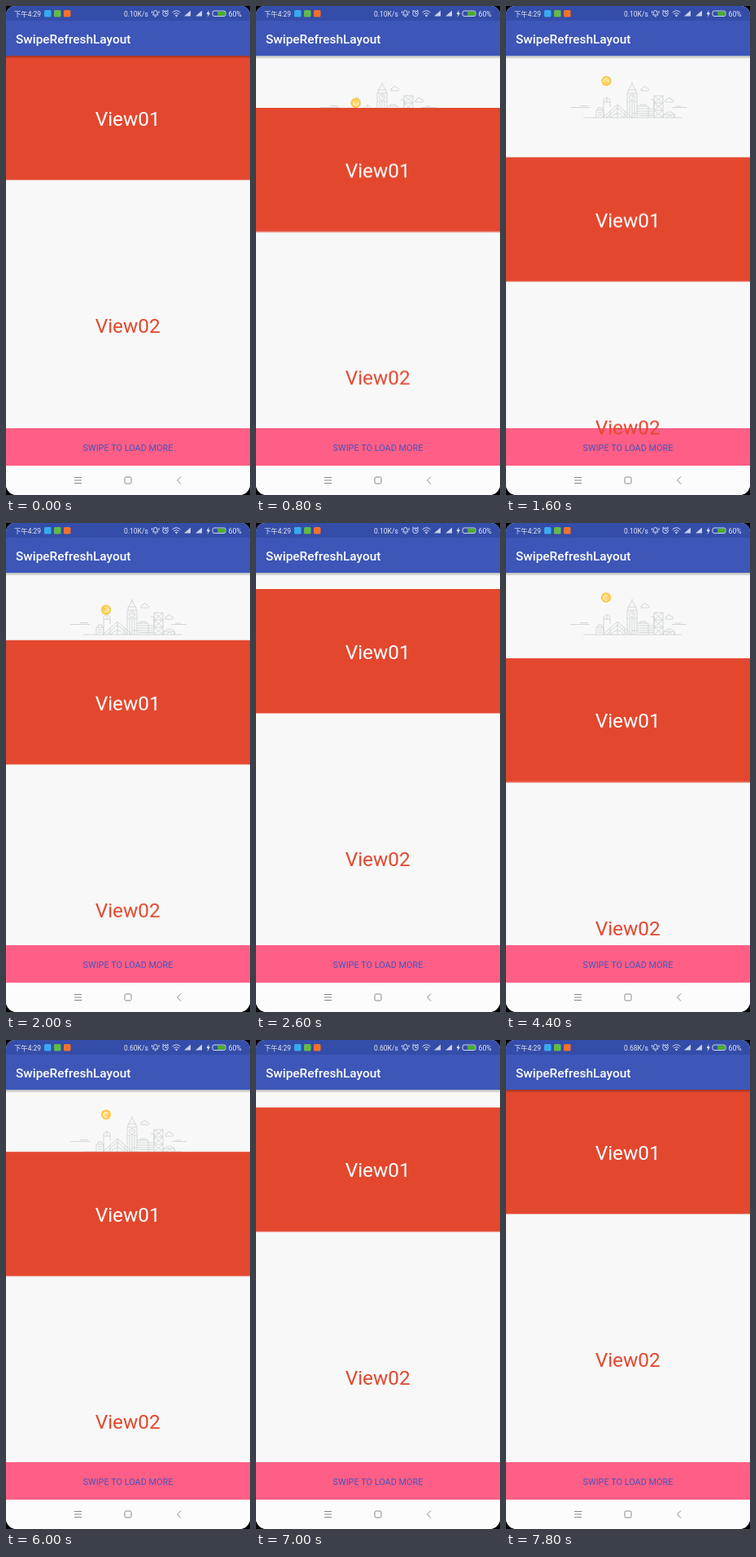
These frames come from a looping animation (300 px wide and 600 px high, 8 s). An HTML page:

```html
<!DOCTYPE html>
<html lang="en">
<head>
<meta charset="utf-8">
<title>Pull to refresh</title>
<style>
  html, body { margin: 0; width: 100%; height: 100%; overflow: hidden; background: #000; }
  svg { display: block; width: 300px; height: 600px; font-family: Roboto, "Noto Sans CJK SC", "Noto Sans CJK", sans-serif; }

  .content, .rise, .spin, .speed { animation: 8s infinite; }
  .content { animation-name: pull; }
  .rise { animation-name: rise; }
  .spin { animation-name: spin; animation-timing-function: steps(40); }
  .speed { animation-timing-function: step-end; }
  .idle { animation-name: idle; }
  .load { animation-name: load; }
  .done { animation-name: done; }

  /* Each segment advances once every 200 ms. */
  @keyframes pull {
    0%    { transform: translateY(0); animation-timing-function: step-end; }
    2.5%  { transform: translateY(0); animation-timing-function: steps(3); }
    10%   { transform: translateY(63.5px); animation-timing-function: steps(4); }
    20%   { transform: translateY(124.6px); animation-timing-function: steps(5); }
    32.5% { transform: translateY(20px); animation-timing-function: steps(3); }
    40%   { transform: translateY(140px); animation-timing-function: step-end; }
    42.5% { transform: translateY(104.5px); animation-timing-function: step-end; }
    65%   { transform: translateY(104.5px); animation-timing-function: steps(4); }
    75%   { transform: translateY(76.2px); animation-timing-function: steps(7); }
    92.5%, 100% { transform: translateY(0); }
  }
  @keyframes rise {
    0%    { transform: translate(123px, 161px); animation-timing-function: step-end; }
    2.5%  { transform: translate(123px, 161px); animation-timing-function: steps(3); }
    10%   { transform: translate(123px, 119px); animation-timing-function: steps(3); }
    17.5% { transform: translate(123px, 92px); animation-timing-function: step-end; }
    22.5% { transform: translate(123px, 92px); animation-timing-function: steps(4); }
    32.5% { transform: translate(123px, 148px); animation-timing-function: steps(3); }
    40%, 92.5% { transform: translate(123px, 92px); animation-timing-function: step-end; }
    100%  { transform: translate(123px, 161px); }
  }
  @keyframes spin { to { transform: rotate(1800deg); } }
  @keyframes idle { 0% { opacity: 1; } 57.5%, 100% { opacity: 0; } }
  @keyframes load { 0% { opacity: 0; } 57.5% { opacity: 1; } 97.5%, 100% { opacity: 0; } }
  @keyframes done { 0% { opacity: 0; } 97.5%, 100% { opacity: 1; } }
</style>
</head>
<body>
<svg viewBox="0 0 300 600">
  <defs>
    <linearGradient id="shade" x2="0" y2="1">
      <stop stop-color="#000" stop-opacity=".28"/>
      <stop offset="1" stop-color="#000" stop-opacity="0"/>
    </linearGradient>
    <path id="signal" d="M0 7H8V0Z"/>
    <path id="cloud" d="M0 6H9Q11 5 9 3Q8 2 7 3Q6 -1 3 1Q2 2 2 3Q-1 3 0 6Z"/>
    <clipPath id="screen">
      <path d="M11 0H289A11 11 0 0 1 300 11V587A13 13 0 0 1 287 600H13A13 13 0 0 1 0 587V11A11 11 0 0 1 11 0Z"/>
    </clipPath>
  </defs>

  <g clip-path="url(#screen)">
    <rect width="300" height="600" fill="#f8f8f8"/>

    <!-- Skyline -->
    <g fill="none" stroke="#cbd0ce" stroke-width=".8">
      <path d="M95 137H216M79 124.500H103M91 122.500H101M204 124.500H222M208 123H215"/>
      <path d="M111 137V128H120V137M113 128V125H118V128M113 131H118M113 134H118M120 137V115L124 112L128 115V124M120 118H128M124 112V118"/>
      <path d="M119 137L137 121L155 137M124 137L137 125L150 137M129 137Q137 126 145 137M137 121V137M128 129V137M146 129V137"/>
      <path d="M149 137V107H161V137M149 117H161M150 107V103H160V107M151 103L155 95L159 103M155 95V93M152 118V137M155 118V137M158 118V137"/>
      <circle cx="155" cy="112" r="3.500"/>
      <path d="M155 110V112H157M161 123H175V137M161 126H175M161 129H182M165 123V121H172V123M155 132H182M163 134.500H182M175 126H182M178 115H182V126"/>
      <path d="M182 137V110H193V137M182 110L193 119L182 128L193 137M193 110L182 119L193 128L182 137M182 119H193M182 128H193"/>
      <path d="M193 137Q195 130 201 130T208 137M197 137Q201 131 205 137M193 133H207V137"/>
      <use href="#cloud" x="166" y="98"/>
      <use href="#cloud" x="196" y="112"/>
    </g>

    <g class="rise"><g class="spin">
      <circle cx=".5" r="6" fill="#ffd35f"/>
      <circle cx=".5" r="5.200" fill="none" stroke="#fdc548" stroke-width="1.600"/>
      <path d="M-2.500 1.500A3 3 0 1 1 2.500 2" fill="none" stroke="#fff0c4" stroke-width="1.300"/>
      <circle cx=".5" r="1.100" fill="#ffe9ae"/>
    </g></g>

    <rect class="content" y="61" width="300" height="152.500" fill="#e3482f"/>
    <rect y="518" width="300" height="46" fill="#ff5f87"/>
    <text x="150" y="545.500" font-size="10.900" text-anchor="middle" fill="#4653bd">SWIPE TO LOAD MORE</text>
    <g class="content" font-size="24.400" text-anchor="middle">
      <text x="149.700" y="146.500" fill="#fff">View01</text>
      <text x="149.700" y="401.300" fill="#e3482f">View02</text>
    </g>

    <!-- Title and status bars -->
    <rect y="61" width="300" height="4" fill="url(#shade)"/>
    <rect width="300" height="61" fill="#3d56b8"/>
    <rect width="300" height="18" fill="#344da8"/>
    <text x="12" y="46" font-size="15.400" font-weight="500" fill="#fff">SwipeRefreshLayout</text>

    <g fill="#e4e8f6" font-size="8.500">
      <text x="10" y="12.500" font-size="8.400">下午4:29</text>
      <g text-anchor="end">
        <text class="speed idle" x="174.800" y="12.500">0.10K/s</text>
        <text class="speed load" x="174.800" y="12.500">0.60K/s</text>
        <text class="speed done" x="174.800" y="12.500">0.68K/s</text>
      </g>
      <text x="273.500" y="12.500" font-size="8.700">60%</text>
      <use href="#signal" x="219" y="5.500" opacity=".85"/>
      <use href="#signal" x="233" y="5.500" opacity=".85"/>
      <path d="M249.500 5L246.500 10H248.500L247.500 14L251 8.500H249Z"/>
    </g>
    <rect x="47" y="5" width="8.500" height="8.500" rx="1.500" fill="#36aaf0"/>
    <rect x="59" y="5" width="8.500" height="8.500" rx="1.500" fill="#62bb46"/>
    <rect x="71" y="5" width="8.500" height="8.500" rx="1.500" fill="#f2702c"/>

    <g fill="none" stroke="#e4e8f6" stroke-width=".9">
      <path d="M180.500 11H187Q186 10 186 8Q186 5.500 183.700 5.500T181.500 8Q181.500 10 180.500 11M182.500 12.800H185M179.500 6V9M188 6V9"/>
      <circle cx="196" cy="9.300" r="3.300"/>
      <path d="M196 7V9.500H198M192 6.500L194 5M200 6.500L198 5"/>
      <path d="M204.500 8Q209.500 3.500 214.500 8M206.200 10Q209.500 7 212.800 10M208 11.700Q209.500 10.500 211 11.700"/>
      <rect x="254" y="6" width="16" height="6.500" rx="2"/>
    </g>
    <circle cx="209.500" cy="12.500" r=".8" fill="#e4e8f6"/>
    <rect x="260" y="6.800" width="9.300" height="4.900" rx="1" fill="#4caf2e"/>

    <!-- Navigation bar -->
    <rect y="564" width="300" height="36" fill="#fcfcfc"/>
    <g fill="none" stroke="#858585">
      <path d="M84 578.500H93M84 582H93M84 585.500H93"/>
      <rect x="146" y="578" width="8" height="8" rx="1.500"/>
      <path d="M215 577.500L210.500 582L215 586.500"/>
    </g>
  </g>
</svg>
</body>
</html>
```
